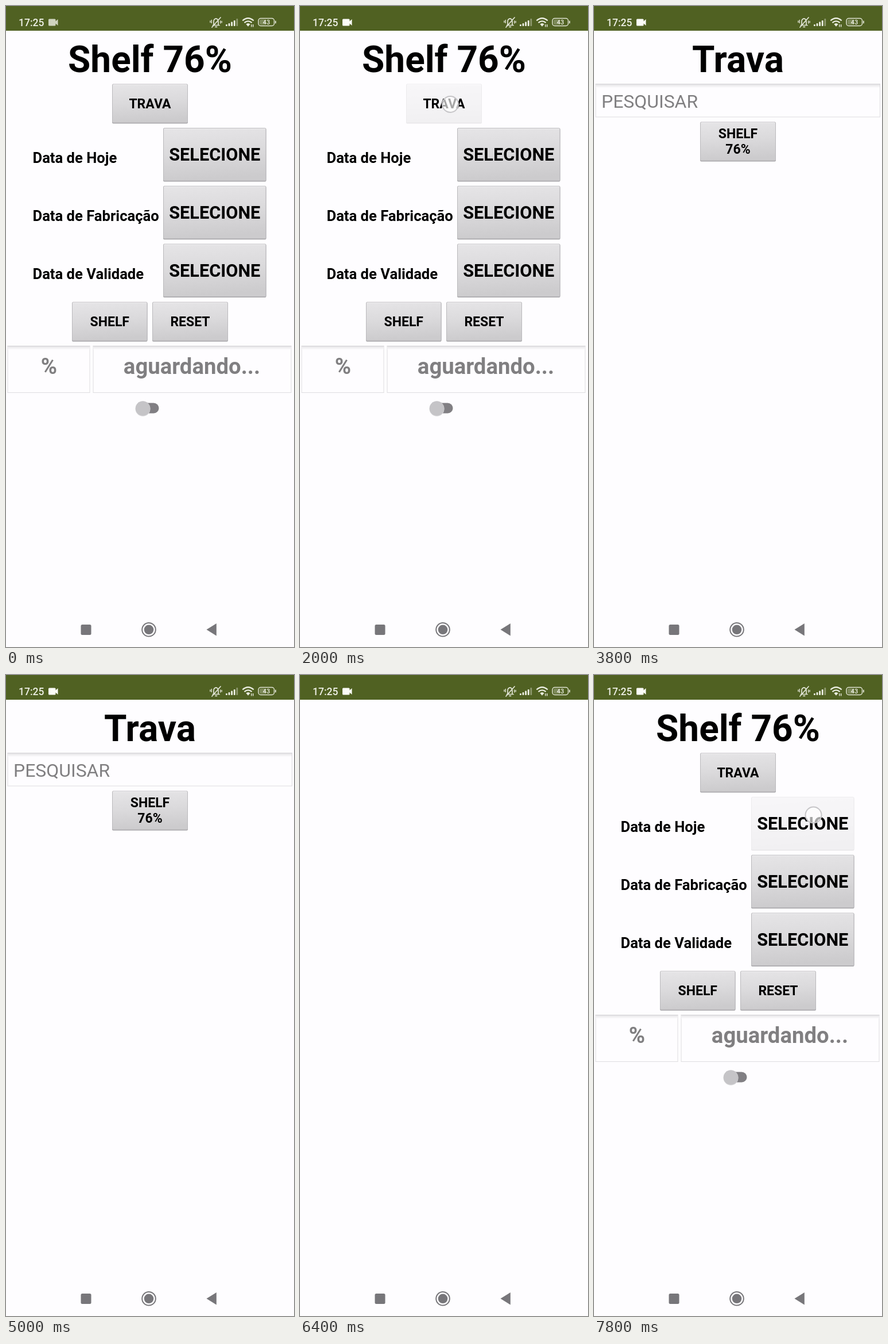
These frames come from a looping animation (502x1115 px, 8 s). An HTML page:

```html
<!DOCTYPE html>
<html lang="pt">
<head>
<meta charset="utf-8">
<title>Shelf 76%</title>
<style>
  html, body { margin: 0; width: 100%; height: 100%; overflow: hidden; background: #fefdff; }
  svg { display: block; width: 502px; height: 1115px; }
  text { font-family: Roboto, sans-serif; font-weight: 700; }
  .mid { text-anchor: middle; }
  .hint { fill: #807f81; }
  .hidden { visibility: hidden; }
  .pressed { opacity: .25; }
</style>
</head>
<body>
<svg viewBox="0 0 502 1115">
  <defs>
    <linearGradient id="face" x1="0" y1="0" x2=".12" y2="1">
      <stop offset="0" stop-color="#e6e5e7"/>
      <stop offset=".5" stop-color="#dbdadc"/>
      <stop offset="1" stop-color="#cccbcd"/>
    </linearGradient>
    <linearGradient id="inset" x1="0" y1="0" x2="0" y2="1">
      <stop offset="0" stop-color="#e6e5e7"/>
      <stop offset="1" stop-color="#fefdff"/>
    </linearGradient>
  </defs>
  <rect width="502" height="1115" fill="#fefdff"/>

  <g id="home"></g>
  <g id="lock" class="hidden"></g>

  <g id="touch" class="hidden">
    <circle r="14" fill="#fff" fill-opacity=".65" stroke="#c6c5c8" stroke-width="2"/>
  </g>

  <g id="status">
    <rect width="502" height="43" fill="#506122"/>
    <text x="22" y="35" font-size="17.5" style="font-weight:500" fill="#eef0e6">17:25</text>
    <path id="camera" d="M75.5 22.5h9.5q1.5 0 1.5 1.5v2.6l4-3.6v11l-4-3.6v2.6q0 1.5-1.5 1.5h-9.500q-1.500 0-1.500-1.500v-9q0-1.500 1.500-1.500z"/>
    <g fill="none" stroke="#e3e6d8" stroke-width="1.7" stroke-linecap="round">
      <path d="M360.500 33.500h11.500M362 33v-6q0-4.500 4-5.200q4 .7 4 5.200v6M365 36.300h2.500M359 37l15-17"/>
      <path d="M358.300 24.500v5M356 26v2.500M373.700 26v4M376 26.500v2.500" stroke-width="1.400"/>
    </g>
    <g id="bars" fill="#eef0e6"></g>
    <g fill="none" stroke="#e9ecdf" stroke-width="2.300">
      <path d="M412.300 25.500q9.700-8.500 19.400 0M415.500 29.200q6.500-5.600 13 0"/>
      <path d="M418.300 31.500q3.700-3 7.400 0l-3.700 4.300z" fill="#e9ecdf" stroke="none"/>
      <path d="M427.800 32v4.500M430.700 32v4.500" stroke-width="1.400"/>
    </g>
    <rect x="440" y="21.500" width="27.500" height="13" rx="4" fill="none" stroke="#dfe3d2" stroke-width="1.500"/>
    <rect x="442" y="23.500" width="10" height="9" rx="2" fill="#7d8a5a"/>
    <rect x="469" y="25.500" width="1.800" height="5" rx=".9" fill="#dfe3d2"/>
    <text class="mid" x="454" y="32.200" font-size="11" style="font-weight:500" fill="#f3f5ec">43</text>
  </g>

  <g fill="#77767a">
    <rect x="130.500" y="1076" width="18" height="18" rx="2.500"/>
    <circle cx="249" cy="1084.800" r="8.300"/>
    <circle cx="249" cy="1084.800" r="11.800" fill="none" stroke="#77767a" stroke-width="2"/>
    <path d="M349.500 1084.800l17.300-10.800v21.600z"/>
  </g>
</svg>
<script>
const $ = id => document.getElementById(id);

const label = (str, x, y, size, attrs = 'class="mid"') =>
  `<text x="${x}" y="${y}" font-size="${size}" ${attrs}>${str}</text>`;

function button(id, x, y, w, h, lines, size) {
  const lead = 27, mid = x + w / 2;
  const first = y + h / 2 + size * .355 - (lines.length - 1) * lead / 2;
  return `<g id="${id}">
    <rect x="${x}" y="${y + 1}" width="${w}" height="${h}" rx="2" fill="#a3a2a5"/>
    <rect x="${x + .5}" y="${y + .5}" width="${w - 1}" height="${h - 1}" rx="1.500" fill="url(#face)" stroke="#bab9bc"/>
    <path d="M${x + 2} ${y + 1.5}h${w - 4}" stroke="#efeef0"/>
  </g>` + lines.map((s, i) => label(s, mid, first + i * lead, size)).join('');
}

const field = (x, y, w, h) =>
  `<rect x="${x + .5}" y="${y + .5}" width="${w - 1}" height="${h - 1}" fill="#fefdff" stroke="#dedde0"/>
   <rect x="${x + 1}" y="${y + 1}" width="${w - 2}" height="6" fill="url(#inset)"/>
   <path d="M${x} ${y + .5}h${w}" stroke="#d2d1d4"/>`;

const rows = ['Data de Hoje', 'Data de Fabricação', 'Data de Validade'];

$('home').innerHTML =
  label('Shelf 76%', 251, 114.5, 63.9) +
  button('lockBtn', 185, 135.5, 132, 68, ['TRAVA'], 23) +
  rows.map((name, i) => {
    const y = 212 + i * 100.8;
    return label(name, 46.5, y + 61, 25.6, '') +
      button('date' + i, 274, y, 179.5, 92.5, ['SELECIONE'], 30.7);
  }).join('') +
  button('calc', 115, 514.7, 131.5, 68, ['SHELF'], 23) +
  button('reset', 255, 514.7, 132, 68, ['RESET'], 23) +
  field(2.5, 591, 144, 82) + field(151.5, 591, 346, 82) +
  label('%', 75, 639.5, 38.3, 'class="mid hint"') +
  label('aguardando...', 324, 639.5, 38.3, 'class="mid hint"') +
  `<rect x="232" y="690.500" width="34.500" height="18" rx="9" fill="#817f83"/>
   <circle cx="238.500" cy="700.800" r="13" fill="#dddcdf"/>
   <circle cx="238.500" cy="700" r="12.800" fill="#c5c4c7"/>`;

$('lock').innerHTML =
  label('Trava', 251, 114.5, 63.9) +
  field(2.5, 135.5, 496.5, 58) +
  label('PESQUISAR', 13, 177, 31.95, 'class="hint" style="font-weight:400"') +
  button('backBtn', 185, 201.5, 132, 68, ['SHELF', '76%'], 23);

$('bars').innerHTML = [3, 5, 7.5, 10, 13].map((h, i) =>
  `<rect x="${383 + i * 4.6}" y="${35 - h}" width="2.800" height="${h}" rx="1" opacity="${i < 4 ? 1 : .4}"/>`).join('');

// [start ms, visible screen]
const screens = [[0, 'home'], [3800, 'lock'], [6400, ''], [6600, 'home']];
const presses = [
  { id: 'lockBtn', from: 2000, to: 2200, x: 262, y: 171 },
  { id: 'backBtn', from: 5600, to: 5800, x: 262, y: 238 },
  { id: 'date0', from: 7800, to: 8000, x: 382.5, y: 243.5 }
];

function draw(t) {
  const screen = screens.filter(s => s[0] <= t).pop()[1];
  for (const id of ['home', 'lock']) $(id).classList.toggle('hidden', id !== screen);

  let active = null;
  for (const p of presses) {
    const on = t >= p.from && t < p.to;
    $(p.id).classList.toggle('pressed', on);
    if (on) active = p;
  }
  $('touch').classList.toggle('hidden', !active);
  if (active) $('touch').setAttribute('transform', `translate(${active.x} ${active.y})`);
  $('camera').setAttribute('fill', t < 400 ? '#cfd4bf' : '#fbfcf7');
}

const start = performance.now();
function tick() {
  draw((performance.now() - start) % 8000);
  requestAnimationFrame(tick);
}
tick();
</script>
</body>
</html>
```
